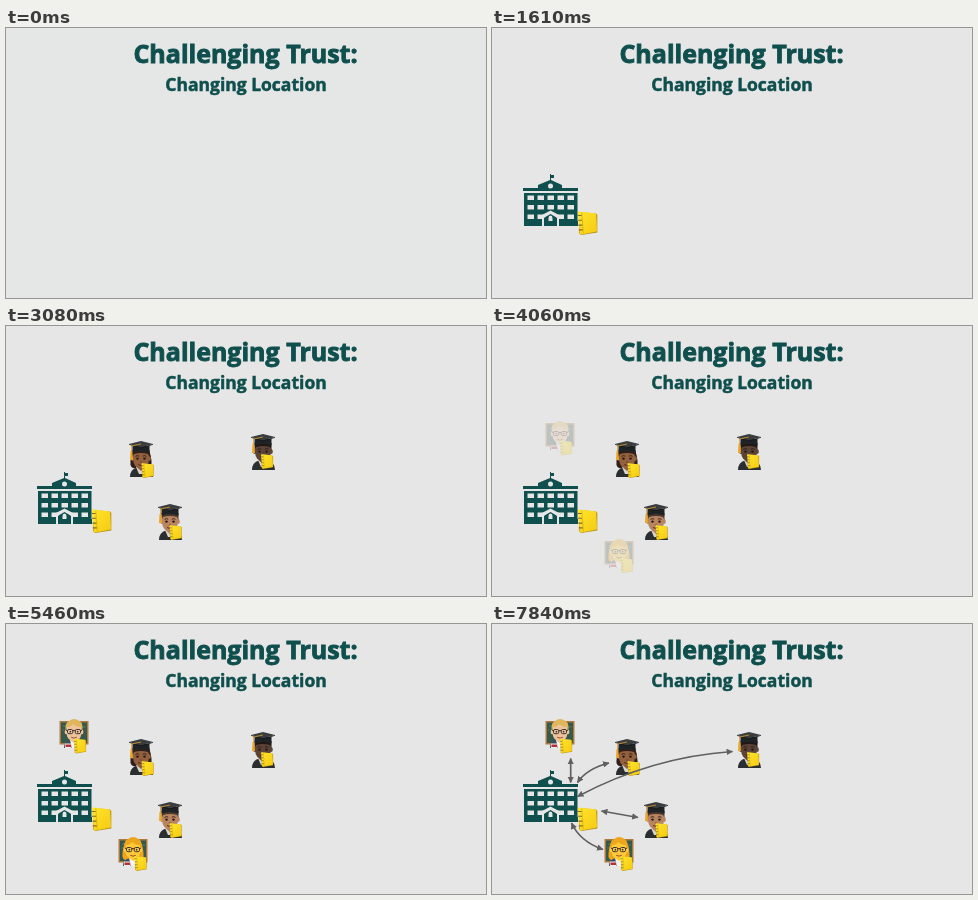
These frames come from a looping animation (480x270 px, 8000 ms). An HTML page:

```html
<!DOCTYPE html>
<html lang="en">
<head>
<meta charset="utf-8">
<title>Changing Location</title>
<style>
  html, body { margin: 0; width: 100%; height: 100%; overflow: hidden; background: #e6e6e6; }
  svg { display: block; width: 100%; height: 100%; }
  text { font-family: "Open Sans", "Noto Sans", sans-serif; font-weight: 700; fill: #0f4f4d; stroke: #0f4f4d; text-anchor: middle; }
  .title { font-size: 25px; stroke-width: .9px; }
  .subtitle { font-size: 17.5px; stroke-width: .5px; }
  .arrow { fill: none; stroke: #606060; stroke-width: 1.7; marker-start: url(#tip); marker-end: url(#tip); }
  .fade { opacity: 0; }
</style>
</head>
<body>
<svg viewBox="0 0 480 270">
  <defs>
    <linearGradient id="cover" x2="1" y2="1">
      <stop offset="0" stop-color="#ffe62e"/>
      <stop offset="1" stop-color="#f5ca10"/>
    </linearGradient>
    <marker id="tip" viewBox="0 0 6 6" refX="5.5" refY="3" markerWidth="6.5" markerHeight="6.5" markerUnits="userSpaceOnUse" orient="auto-start-reverse">
      <path d="M0 0L6 3L0 6Z" fill="#606060"/>
    </marker>

    <!-- Notebook, 20 x 24 -->
    <g id="book">
      <path d="M2 1L19 2.5L20.3 4V21.5L4 24L2 22Z" fill="#b48d17"/>
      <path d="M1.5 .5L18.2 2.2Q19.2 2.4 19.2 3.4L20 19.6Q20 20.6 19 20.8L4 23.4Q3 23.5 2.8 22.5L.9 1.3Q.9 .5 1.5 .5Z" fill="url(#cover)"/>
      <path d="M4.8 1.2L6.4 22.6" stroke="#d9aa0d" stroke-width=".7"/>
      <path d="M.6 4.500h4M1 9.300h4M1.400 14.100h4M1.800 18.900h4" stroke="#876b20" stroke-width="1.1"/>
    </g>

    <!-- Graduate, head centred on the origin -->
    <g id="graduate">
      <path d="M-11 21Q-11 13.500 -4 11.500H4Q12 13 12 21Z" fill="#2b2e30"/>
      <path d="M-5 11H5L2 18H-2Z" fill="#d9d6d2"/>
      <path d="M-3.500 9H3.500V12L0 15L-3.500 12Z" fill="var(--skin)"/>
      <ellipse cx="-8" cy="2.500" rx="1.800" ry="2.500" fill="var(--skin)"/>
      <ellipse cx="8" cy="2.500" rx="1.800" ry="2.500" fill="var(--skin)"/>
      <path d="M-8 -5H8V3Q7.500 12 0 12.500Q-7.500 12 -8 3Z" fill="var(--skin)"/>
      <path d="M-8.500 -6H8.500V1L7 -2Q0 -4 -7 -2L-8.500 1Z" fill="var(--hair)"/>
      <path d="M-5.500 .4Q-3.600 -1 -1.800 .2M1.800 .2Q3.600 -1 5.500 .4" fill="none" stroke="#2d1c16" stroke-width=".9"/>
      <circle cx="-3.500" cy="2.600" r="1.200" fill="#251713"/>
      <circle cx="3.500" cy="2.600" r="1.200" fill="#251713"/>
      <path d="M-1 5.800Q0 6.600 1 5.800" fill="none" stroke="#55352a" stroke-width=".7"/>
      <path d="M-3 8.600Q0 10.200 3 8.600" fill="none" stroke="#5d2723" stroke-width="1"/>
      <path d="M-8.500 -10H8.500V-3.500Q0 -6.500 -8.500 -3.500Z" fill="#202326"/>
      <path d="M-12 -12L0 -15L12 -12L0 -8.500Z" fill="#393d40"/>
      <path d="M-12 -12L0 -8.500L12 -12V-11.200L0 -7.500L-12 -11.200Z" fill="#181b1d"/>
      <path d="M0 -12L-9.500 -10V-4" fill="none" stroke="#d89b25" stroke-width=".8"/>
      <path d="M-10.500 -5H-8.700L-8 4H-11Z" fill="#e8a72b"/>
    </g>

    <!-- Teacher and blackboard, head centred on the origin -->
    <g id="board">
      <rect x="-14.5" y="-9" width="29" height="23.5" fill="#af7a42"/>
      <rect x="-13" y="-7.5" width="26" height="20.5" fill="#35594a"/>
      <path d="M-11 -4h4M8 -3h4M-12 0h2" stroke="#6d8a7d" stroke-width=".6"/>
    </g>
    <g id="teacher">
      <path d="M-10 18Q-10 11 -3 10H4Q10 11 10 18Z" fill="#394c60"/>
      <path d="M-4 10H4L2 18H-2Z" fill="#f5f3ef"/>
      <path d="M-9 13.500H-2.500V18H-9Z" fill="#eeeeee"/>
      <path d="M-8.500 14.500H-3V17H-8.500Z" fill="#b92f36"/>
      <path d="M-3 8H3V11L0 13L-3 11Z" fill="var(--skin)"/>
      <ellipse cx="-7.800" cy="2" rx="1.600" ry="2.200" fill="var(--skin)"/>
      <ellipse cx="7.800" cy="2" rx="1.600" ry="2.200" fill="var(--skin)"/>
      <path d="M-7.600 -5Q0 -10 7.600 -5V3Q6.500 11 0 11.500Q-6.500 11 -7.600 3Z" fill="var(--skin)"/>
      <path d="M-8.200 1Q-9.500 -7 -5 -9Q0 -13 5.500 -9Q9.500 -7 8.200 1L6.800 -3Q2 -3 -1 -6Q-3 -3 -6.800 -3Z" fill="var(--hair)"/>
      <g fill="#fff" fill-opacity=".15" stroke="#403431" stroke-width="1">
        <rect x="-6.500" y="-.5" width="5.300" height="4.200" rx="1.500"/>
        <rect x="1.200" y="-.5" width="5.300" height="4.200" rx="1.500"/>
        <path d="M-1.200 .6H1.200M-8 .3H-6.500M6.500 .3H8"/>
      </g>
      <circle cx="-3.600" cy="1.700" r=".9" fill="#44291d"/>
      <circle cx="3.600" cy="1.700" r=".9" fill="#44291d"/>
      <path d="M-2.800 7.200Q0 9.200 2.800 7.200" fill="none" stroke="#8f4b32" stroke-width="1"/>
    </g>
  </defs>

  <rect id="backdrop" width="480" height="270" fill="#e4e7e6"/>
  <text class="title" x="239.5" y="35">Challenging Trust:</text>
  <text class="subtitle" x="240" y="63">Changing Location</text>

  <g class="fade" id="school">
    <g fill="#0f4f4d">
      <path d="M58 146H59V147H62V150H59V152L70 157V160H86V163H31V160H46V157L58 152Z"/>
      <path d="M32 165H85.500V193H86V198H32Z"/>
    </g>
    <g fill="#e6e6e6">
      <circle cx="58.500" cy="158" r="2.500"/>
      <g id="windows"></g>
      <path d="M48 188L58.500 182.500L69 188V190H67V198H65V190H52V198H50V190H48Z"/>
    </g>
    <path d="M52.500 189.500L58.500 186L64.500 189.500V198H52.500Z" fill="#0f4f4d"/>
    <path d="M56.500 193V190Q56.500 187.500 58.500 187.500Q60.500 187.500 60.500 190V193Z" fill="#e6e6e6"/>
    <use href="#book" x="85" y="183"/>
  </g>
  <g class="fade" id="students"></g>
  <g class="fade" id="teachers"></g>
  <g class="fade" id="teacherArrows">
    <path class="arrow" d="M78.700 134.500V158.500"/>
    <path class="arrow" d="M79.500 199Q88 217.500 111 225.500"/>
  </g>
  <g class="fade" id="studentArrows">
    <path class="arrow" d="M85.500 158.500Q95 144.500 117 139"/>
    <path class="arrow" d="M85.500 172.500Q160 133 240.500 127.500"/>
    <path class="arrow" d="M109.500 187L146 193.500"/>
  </g>
</svg>
<script>
const LOOP = 8000, STEP = 70;
const byId = id => document.getElementById(id);

// kind, x, y, skin, hair, book x, book y, long hair
const people = [
  ['graduate', 135, 130, '#94613f', '#30201c', 135, 137, true],
  ['graduate', 257, 123, '#5c4338', '#211815', 254.5, 128, false],
  ['graduate', 164, 193, '#b98560', '#4a372d', 163, 199, false],
  ['teacher', 68, 106, '#eec39b', '#dfb65b', 67.5, 114.5, false],
  ['teacher', 127, 224, '#ffc938', '#eda51e', 128, 232, true]
];

const mane = color =>
  `<path fill="${color}" d="M-7 -8Q-11 0 -10.500 9Q-9 13 -5 12H5Q9 13 10.500 9Q11 0 7 -8Z"/>`;

for (const [kind, x, y, skin, hair, bookX, bookY, long] of people) {
  const isTeacher = kind === 'teacher';
  byId(kind + 's'.replace('s', '')) && byId(isTeacher ? 'teachers' : 'students').insertAdjacentHTML('beforeend', `
    <g transform="translate(${x} ${y})" style="--skin:${skin};--hair:${hair}">
      ${isTeacher ? '<use href="#board"/>' : ''}
      ${long ? mane(hair) : ''}
      <use href="#${kind}"/>
    </g>
    <use href="#book" transform="translate(${bookX} ${bookY}) scale(.62)"/>`);
}

for (let row = 0; row < 3; row++)
  for (let col = 0; col < 5; col++)
    if (row < 2 || col !== 2)
      byId('windows').insertAdjacentHTML('beforeend',
        `<rect x="${35.5 + col * 10}" y="${167.5 + row * 9.5}" width="6.5" height="4.5"/>`);

// id, start time, first opacity, time to rise by one
const fades = [
  ['school', 770, .1, 600],
  ['students', 2450, .12, 550],
  ['teachers', 4060, .25, 600],
  ['teacherArrows', 5600, .15, 550],
  ['studentArrows', 6930, .12, 600]
];

function draw(now) {
  const t = Math.floor((now % LOOP) / STEP) * STEP;
  for (const [id, start, first, span] of fades)
    byId(id).style.opacity = t < start ? 0 : Math.min(1, first + (t - start) / span);
  byId('backdrop').setAttribute('fill', t < 770 ? '#e4e7e6' : '#e6e6e6');
}

const origin = performance.now();
function tick() {
  draw(performance.now() - origin);
  requestAnimationFrame(tick);
}
tick();
</script>
</body>
</html>
```
